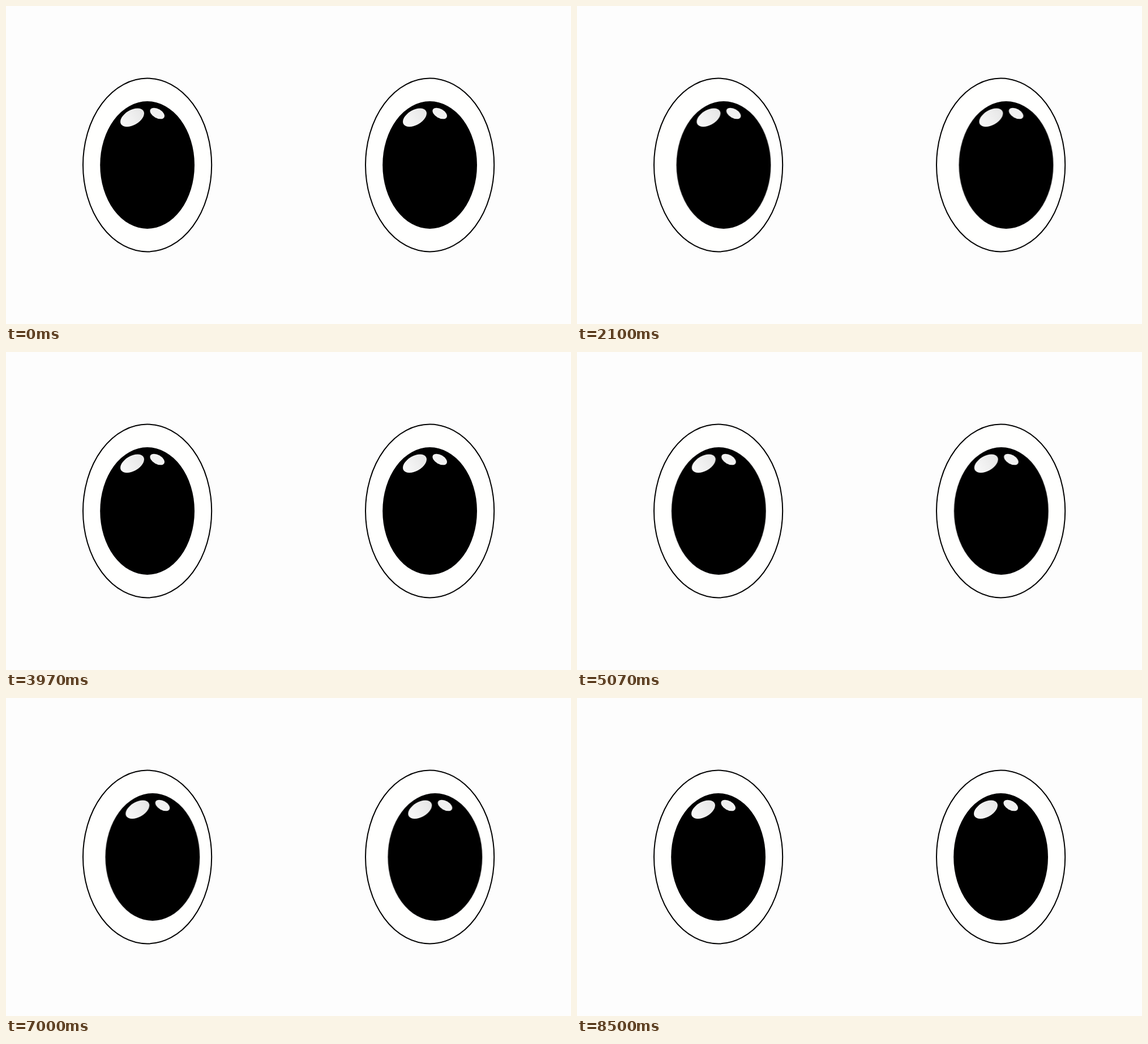
Animation, 998 px wide and 561 px high, one loop 8.53 s. Source, as an HTML page:

```html
<!DOCTYPE html>
<html lang="en">
<head>
<meta charset="utf-8">
<title>Eyes</title>
<style>
  html, body {
    margin: 0;
    width: 100%;
    height: 100%;
    overflow: hidden;
    background: #fdfdfd;
  }
  svg { display: block; width: 100vw; height: 100vh; }
  .white { fill: #fffffe; stroke: #000; stroke-width: 2; }
  .pupil { animation: look 4265ms infinite; }

  /* Rest to the right, glance left, settle in the centre, drift back. */
  @keyframes look {
    0% { transform: translateX(0); animation-timing-function: cubic-bezier(.7, 0, .9, .5); }
    23.45% { transform: translateX(1.6px); animation-timing-function: cubic-bezier(.3, .3, .4, 1); }
    28.5%, 49.2% { transform: translateX(9.4px); animation-timing-function: ease-in; }
    64.1% { transform: translateX(9.3px); animation-timing-function: cubic-bezier(.5, 0, .75, .65); }
    73.4% { transform: translateX(-3.7px); animation-timing-function: cubic-bezier(.2, .6, .5, 1); }
    79% { transform: translateX(-6px); animation-timing-function: cubic-bezier(.4, 0, .3, 1); }
    93%, 100% { transform: translateX(0); }
  }
</style>
</head>
<body>
<svg viewBox="0 0 998 561" preserveAspectRatio="none">
  <defs>
    <linearGradient id="shine" x1="0" y1="0" x2="1" y2="0">
      <stop offset="0" stop-color="#f9f9f9"/>
      <stop offset="1" stop-color="#e6e6e6"/>
    </linearGradient>
    <g id="pupil">
      <ellipse cx="249.6" cy="280.5" rx="83.4" ry="112.4"/>
      <ellipse rx="23" ry="13.2" fill="url(#shine)" transform="translate(223 196.8) rotate(-30)"/>
      <ellipse rx="14" ry="8" fill="#f1f1f1" transform="translate(267.2 189.5) rotate(30)"/>
    </g>
    <ellipse id="white" class="white" cx="249.6" cy="280.5" rx="113.6" ry="152.9"/>
  </defs>
  <use href="#white"/>
  <use href="#white" x="499"/>
  <g class="pupil">
    <use href="#pupil"/>
    <use href="#pupil" x="499"/>
  </g>
</svg>
</body>
</html>
```
